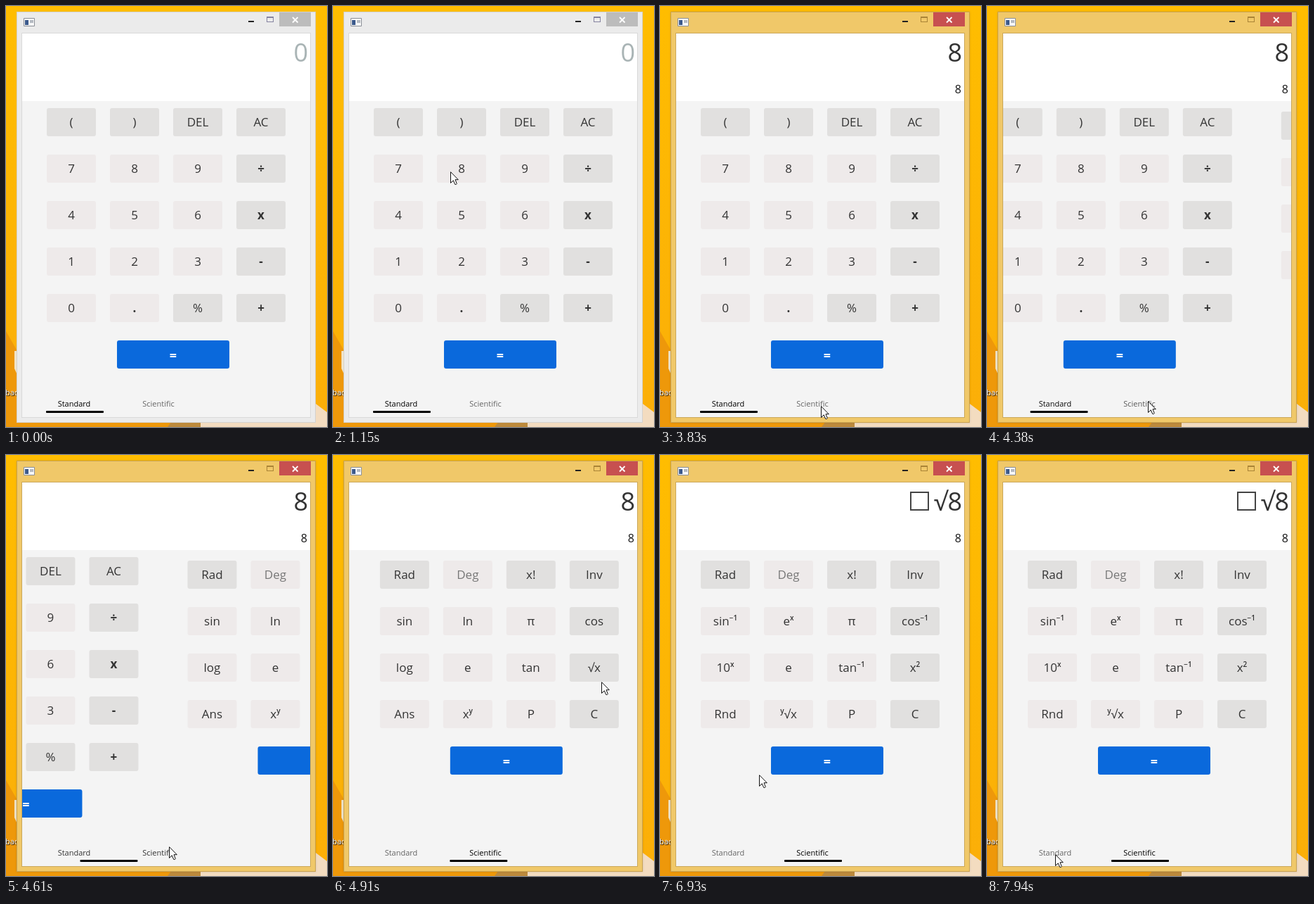
An HTML page that plays this animation: 457x598 px, repeating every 8000 ms.

```html
<!DOCTYPE html>
<html lang="en">
<head>
<meta charset="utf-8">
<title>Calculator</title>
<style>
html, body { margin: 0; width: 100%; height: 100%; overflow: hidden; }
body { position: relative; font-family: "Open Sans", "Noto Sans", sans-serif; color: #333; }
div, svg { position: absolute; box-sizing: border-box; }
#stage { width: 457px; height: 598px; overflow: hidden; }
#iconLabel { left: -1px; top: 541px; font-size: 11px; line-height: 15px; color: #fff; text-shadow: 1px 1px 1px #000; }
#window { left: 15px; top: 8px; width: 426px; height: 584px; background: #ebebeb; border: 1px solid #d3d2cf; }
.active #window { background: #f0c869; border-color: #c9a352; box-shadow: 0 0 3px #0002; }
#close { left: 389px; top: 9px; width: 45px; height: 20px; background: #bcbcbc; }
.active #close { background: #c75050; }
#max { left: 371px; top: 15px; width: 10px; height: 8px; border: 1px solid #8583a0; border-top-width: 2px; }
.active #max { border-color: #aa8436; }
#min { left: 345px; top: 21px; width: 8px; height: 2px; background: #222; }
#client { left: 22px; top: 38px; width: 412px; height: 547px; background: #f4f4f4; border: 1px solid #d9d9d9; overflow: hidden; }
.active #client { border-color: #cba85b; }
#screen { width: 411px; height: 96px; background: #fff; z-index: 1; }
#big { right: 4px; top: 2px; font-size: 36px; line-height: 50px; white-space: nowrap; color: #a9b4b5; }
.entered #big { color: #333; }
#big i { display: inline-block; box-sizing: border-box; width: 27px; height: 27px; border: 2px solid #444; margin-right: 7px; }
#small { right: 5px; top: 68px; font-size: 16px; line-height: 22px; color: #111; }
.pane { width: 410px; height: 546px; }
.key { width: 70px; height: 40px; border-radius: 3px; background: #eeeaea; font-size: 17px; line-height: 40px; text-align: center; white-space: nowrap; }
.dark { background: #e1e0df; }
.bold { font-weight: 700; }
.off { color: #777; }
.equals { width: 160px; background: #0a69dc; color: #fff; font-size: 18px; font-weight: 700; line-height: 43px; }
sup { font-size: 10px; font-weight: 600; line-height: 0; vertical-align: 7px; }
.tab { top: 517px; width: 80px; text-align: center; font-size: 11px; line-height: 18px; }
#line { left: 34px; top: 536px; width: 82px; height: 3px; border-radius: 1px; background: #000; }
#ripple { width: 24px; height: 24px; margin: -12px; border-radius: 50%; background: #0000001c; }
</style>
</head>
<body>
<div id="stage">
  <svg width="457" height="598">
    <defs>
      <linearGradient id="wall" x2="0" y2="1">
        <stop offset="0" stop-color="#ffbd00"/><stop offset="1" stop-color="#fbae08"/>
      </linearGradient>
    </defs>
    <path fill="url(#wall)" d="M0 0H457V598H0Z"/>
    <path fill="#ee980a" d="M0 462L16 490V590H240V598H0Z"/>
    <path fill="#bd8a3c" d="M236 590H277V598H230Z"/>
    <path fill="#f3dcc0" d="M277 598V590H441V565L457 577V598Z"/>
    <path fill="#f1e4c8" d="M12 490H18V528L12 515Z"/>
  </svg>
  <div id="iconLabel">bac</div>
  <div id="window"></div>
  <div id="min"></div><div id="max"></div><div id="close"></div>
  <svg width="457" height="40">
    <path fill="#f7f7f7" stroke="#8b8f96" d="M25.500 17.500H40.500V28.500H25.500Z"/>
    <path fill="#3c5a8c" d="M27 20H32V27H27Z"/><path fill="#b5bac2" d="M34 20H39V24H34Z"/>
    <path stroke="#fff" stroke-width="1.800" d="M408 16L415.500 23.500M415.500 16L408 23.500"/>
  </svg>
  <div id="client">
    <div class="pane" id="standard"></div>
    <div class="pane" id="scientific"></div>
    <div id="screen"><div id="big"></div><div id="small"></div></div>
    <div class="tab" style="left:34px">Standard</div>
    <div class="tab" style="left:154px">Scientific</div>
    <div id="line"></div>
  </div>
  <div id="ripple"></div>
  <svg id="cursor" width="13" height="20"><path fill="#fff" stroke="#111" d="M.5 .7V16.400L4.300 12.800L6.700 18.400H8.500L9.300 17.500L7 11.700H11.300Z"/></svg>
</div>
<script>
const $ = id => document.getElementById(id);
const LOOP = 8000, ENTER = 1880, INVERT = 5860, ROOT = 6780;
const presses = [1710, 4150, 5700, 6700, 7870], PRESS_TIME = 70;

const standardKeys = '( ) DEL AC 7 8 9 ÷ 4 5 6 x 1 2 3 - 0 . % +'.split(' ');
const scientificKeys = 'Rad Deg x! Inv sin ln π cos log e tan √x Ans x^y P C'.split(' ');
const inverseKeys = 'Rad Deg x! Inv sin^−1 e^x π cos^−1 10^x e tan^−1 x^2 Rnd ^y√x P C'.split(' ');
const withPowers = label => label.replace(/\^(−1|\w)/, '<sup>$1</sup>');

function buildPane(pane, labels, top) {
  const add = (label, className, x, row) => {
    const key = document.createElement('div');
    key.className = 'key ' + className;
    key.innerHTML = withPowers(label);
    key.style.left = x + 'px';
    key.style.top = top + row * 66 + 'px';
    pane.append(key);
    return key;
  };
  const keys = labels.map((label, i) => {
    const dark = i < 4 || i % 4 === 3 || label === '%';
    const style = label === 'Deg' ? 'off' : dark ? 'dark' : '';
    return add(label, style + ('÷x-+.'.includes(label) ? ' bold' : ''), 35 + i % 4 * 90, i >> 2);
  });
  add('=', 'equals', 135, labels.length / 4);
  return keys;
}
buildPane($('standard'), standardKeys, 106);
const sciKeys = buildPane($('scientific'), scientificKeys, 111);
const tabs = document.querySelectorAll('.tab');

// Pointer stops: arrival time, x, y
const TRAVEL = 300;
const stops = [
  [70, 309, 534], [290, 285, 490], [590, 263, 416], [1000, 157, 245], [1150, 167, 235],
  [1480, 183, 235], [2260, 197, 467], [2730, 358, 377], [3200, 254, 578], [3600, 234, 572],
  [3830, 229, 568], [4070, 229, 562], [4610, 231, 557], [4910, 382, 322], [5070, 406, 246],
  [5450, 384, 170], [6090, 215, 326], [6400, 184, 368], [7090, 93, 552], [7380, 97, 567]
];

function pointerAt(t) {
  const next = stops.findIndex(stop => stop[0] > t);
  if (next < 0) return stops.at(-1).slice(1);
  const [from, to] = [stops[Math.max(0, next - 1)], stops[next]];
  const travel = Math.min(TRAVEL, to[0] - from[0]) || 1;
  const p = Math.max(0, 1 - (to[0] - t) / travel);
  return [1, 2].map(i => Math.round(from[i] + (to[i] - from[i]) * p));
}

// Linear middle with quadratic ends
function easeBoth(p) {
  p = Math.min(1, Math.max(0, p));
  if (p < .2) return 3.125 * p * p;
  if (p > .8) return 1 - 3.125 * (1 - p) ** 2;
  return 1.25 * p - .125;
}

function setHtml(el, html) {
  if (el.shown !== html) el.innerHTML = el.shown = html;
}
const shift = (el, x, y = 0) => el.style.transform = `translate(${x}px, ${y}px)`;
const show = (el, visible) => el.style.visibility = visible ? 'visible' : 'hidden';
const gray = level => `rgb(${level}, ${level}, ${level})`;

function render(t) {
  $('stage').className = (t >= presses[0] ? 'active ' : '') + (t >= ENTER ? 'entered' : '');
  setHtml($('big'), t < ENTER ? '0' : t < ROOT ? '8' : '<i></i>√8');
  setHtml($('small'), t < ENTER ? '' : '8');

  const slide = t < 4300 ? 0 : easeBoth((t - 4237) / 735);
  shift($('standard'), -410 * slide);
  shift($('scientific'), 410 * (1 - slide));
  shift($('line'), 120 * easeBoth((t - 4300) / 735));
  tabs[0].style.color = gray(102 * slide);
  tabs[1].style.color = gray(102 * (1 - slide));
  const labels = t < INVERT ? scientificKeys : inverseKeys;
  sciKeys.forEach((key, i) => setHtml(key, withPowers(labels[i])));

  const [x, y] = pointerAt(t);
  shift($('cursor'), x, y);
  shift($('ripple'), x, y);
  show($('cursor'), t >= stops[0][0]);
  show($('ripple'), presses.some(start => t >= start && t < start + PRESS_TIME));
}

function tick() {
  render(performance.now() % LOOP);
  requestAnimationFrame(tick);
}
tick();
</script>
</body>
</html>
```
